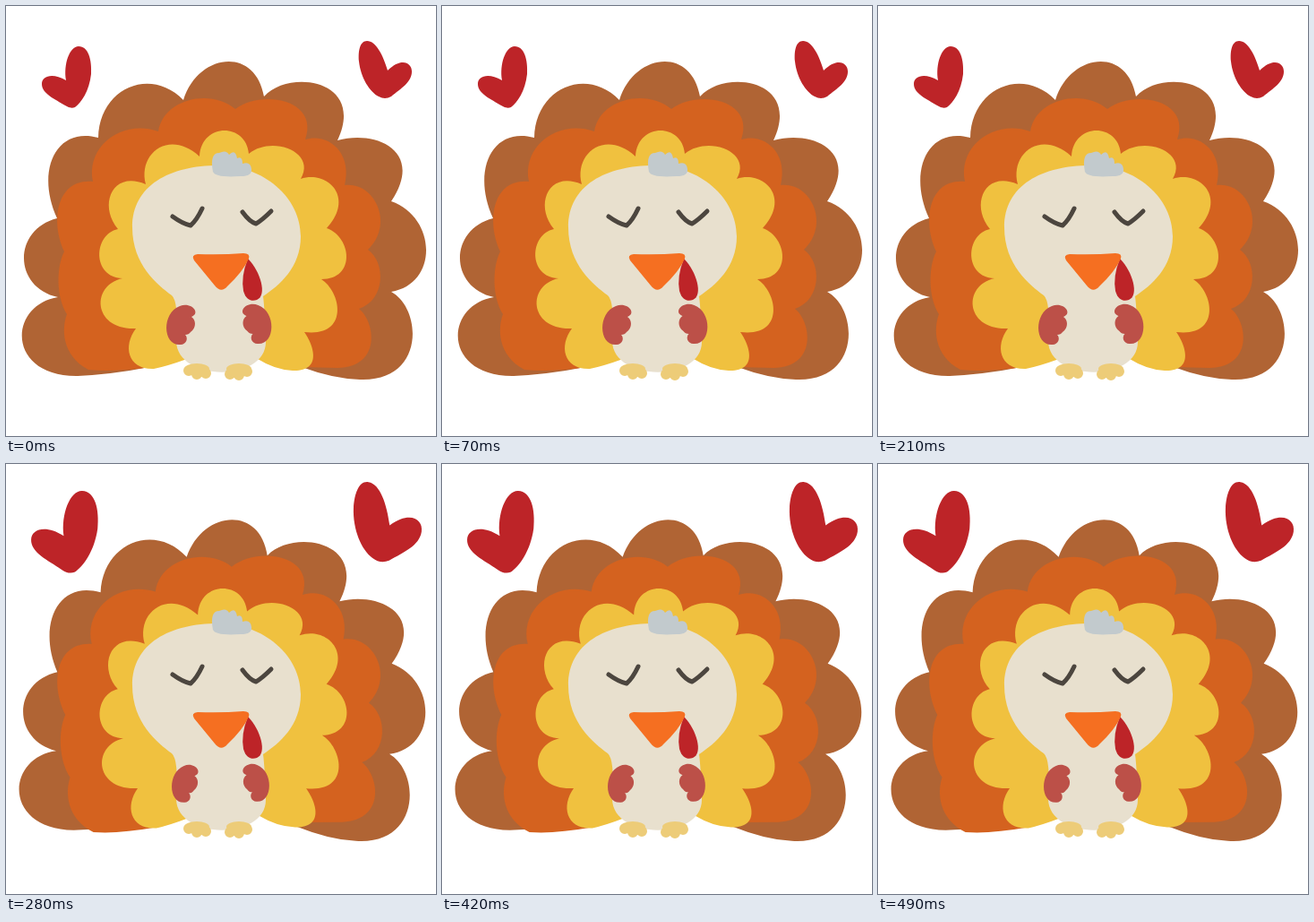
Write an HTML page with a canvas that moves like this. It is 480 px wide and 480 px high and loops after 0.56 s.

```html
<!DOCTYPE html>
<html lang="en">
<head>
<meta charset="utf-8">
<title>Turkey</title>
<style>
  html, body { margin: 0; width: 100%; height: 100%; overflow: hidden; background: #fff; }
  canvas { display: block; width: 480px; height: 480px; }
</style>
</head>
<body>
<canvas id="stage" width="480" height="480"></canvas>
<script>
const ctx = document.getElementById('stage').getContext('2d');
const LOOP = 560;
const RED = '#bd2428';

// Tail layers run clockwise from the bottom left, one curve per feather.
const brown = new Path2D(`M200 390 L160 403 Q120 411 80 413
  C0 414 2 334 58 325 C8 314 7 250 57 237 C33 185 55 134 103 147
  C104 92 161 67 198 105 C214 53 278 44 288 101 C316 70 402 82 370 150
  C412 138 468 161 430 218 C481 236 483 310 430 319 C465 338 468 420 395 417
  Q365 416 330 403 L285 390Z`);
const orange = new Path2D(`M200 390 L162 403 Q120 409 92 406
  C62 390 62 360 68 344 C56 325 56 292 65 274 C49 239 57 192 97 196
  C89 157 129 126 170 140 C176 103 229 92 256 115 C285 93 350 104 334 149
  C360 141 387 164 378 200 C412 196 434 244 404 272 C424 286 424 328 394 338
  C412 352 420 403 370 404 L330 403 L285 390Z`);
const yellow = new Path2D(`M230 365 L202 394 Q180 402 165 405
  C136 406 130 380 145 360 C97 362 94 312 130 304 C96 303 97 255 125 249
  C103 223 118 183 156 199 C147 165 182 137 216 168 C218 130 268 130 271 165
  C297 144 347 163 329 193 C359 183 390 214 358 248 C386 258 391 305 352 305
  C375 320 383 370 333 364 C343 378 354 408 320 407 Q300 406 281 394Z`);

const body = new Path2D(`M237 178 C183 178 141 200 141 247 C141 289 169 311 185 323
  Q193 330 190 374 C191 420 290 420 290 375 Q289 340 287 324
  C305 312 329 292 329 257 C329 214 288 178 237 178Z`);
const tuft = new Path2D(`M231 185 Q227 164 238 164 Q246 160 249 166
  Q256 159 258 170 Q264 167 264 176 Q273 173 274 182
  Q275 190 262 190 Q234 192 231 185Z`);
const eyes = new Path2D('M186 235 Q197 243 206 245 Q213 239 219 226 M264 230 Q272 241 279 243 Q286 239 296 229');
const beak = new Path2D('M214 277 Q206 278 210 284 L233 312 Q240 321 247 313 Q265 296 271 282 Q273 276 265 276 Q240 278 214 277Z');
const wattle = new Path2D('M270 282 Q262 302 265 318 C268 329 275 330 280 328 C292 323 284 296 270 282Z');
// Left wing with its corner at the origin
const wing = new Path2D('M15 2 C28 -3 39 10 28 14 C33 17 34 26 27 31 Q25 34 21 34 C25 38 22 45 16 45 C-4 47 -6 10 15 2Z');

const hearts = [
  {
    path: new Path2D(`M67 83 C64 65 71 45 81 45 C92 45 96 60 95 76 C93 95 84 108 77 113
      Q72 115 66 111 C55 104 40 98 40 87 C40 78 52 74 67 83Z`),
    tip: [73, 114], shift: [-2, 8], turn: 0.035
  },
  {
    path: new Path2D(`M426 72 C421 55 413 39 403 39 C395 39 393 50 394 62 C396 80 406 96 416 101
      Q423 105 430 101 C441 92 453 85 453 73 C453 63 441 57 426 72Z`),
    tip: [423, 103], shift: [-5, 6], turn: 0.153
  }
];

// Feather layers sway in opposite directions around their centres.
const layers = [
  { path: brown, paint: '#b06434', cx: 244, cy: 245, turn: 0.026 },
  { path: orange, paint: '#d4621f', cx: 244, cy: 238, turn: -0.033 },
  { path: yellow, paint: '#f0c13f', cx: 243, cy: 260, turn: -0.02 }
];

function fill(path, paint) {
  ctx.fillStyle = paint;
  ctx.fill(path);
}

function placed(x, y, turn, sx, sy, paint) {
  ctx.save();
  ctx.translate(x, y);
  ctx.rotate(turn);
  ctx.scale(sx, sy);
  paint();
  ctx.restore();
}

function drawTail(up) {
  for (const { path, paint, cx, cy, turn } of layers) {
    placed(cx, cy, up * turn, 1, 1, () => {
      ctx.translate(-cx, -cy);
      fill(path, paint);
    });
  }
}

function drawHearts(up) {
  const size = 1 + 0.34 * up;
  for (const { path, tip: [x, y], shift: [dx, dy], turn } of hearts) {
    placed(x + up * dx, y + up * dy, up * turn, size, size, () => {
      ctx.translate(-x, -y);
      fill(path, RED);
    });
  }
}

function drawWings(up) {
  const x = 179 + 6 * up, y = 333 + 2 * up;
  const sx = 1 - 0.09 * up, sy = 1 - 0.05 * up;
  const mirror = 475.5 + 3.5 * up;
  const paint = () => fill(wing, '#bc5048');
  placed(x, y, 0, sx, sy, paint);
  placed(mirror - x, y - 1, 0, -sx, sy, paint);
}

function drawFoot(x, toes) {
  ctx.fillStyle = '#edcc78';
  ctx.beginPath();
  ctx.ellipse(x, 405, 14, 6, 0, 0, 7);
  for (const [dx, y] of toes) {
    ctx.moveTo(x + dx, y);
    ctx.arc(x + dx, y, 6, 0, 7);
  }
  ctx.fill();
}

function draw(up) {
  ctx.fillStyle = '#fff';
  ctx.fillRect(0, 0, 480, 480);
  drawTail(up);
  drawHearts(up);
  fill(body, '#e8e0ce');
  fill(tuft, '#c2cacd');
  ctx.strokeStyle = '#4c463f';
  ctx.lineWidth = 5;
  ctx.lineCap = ctx.lineJoin = 'round';
  ctx.stroke(eyes);
  fill(wattle, RED);
  fill(beak, '#f56f21');
  drawWings(up);
  drawFoot(213, [[-9, 407], [0, 411], [10, 410]]);
  drawFoot(260, [[-10, 411], [0, 412], [9, 408]]);
}

function tick() {
  draw(performance.now() % LOOP < LOOP / 2 ? 0 : 1);
  requestAnimationFrame(tick);
}
tick();
</script>
</body>
</html>
```
